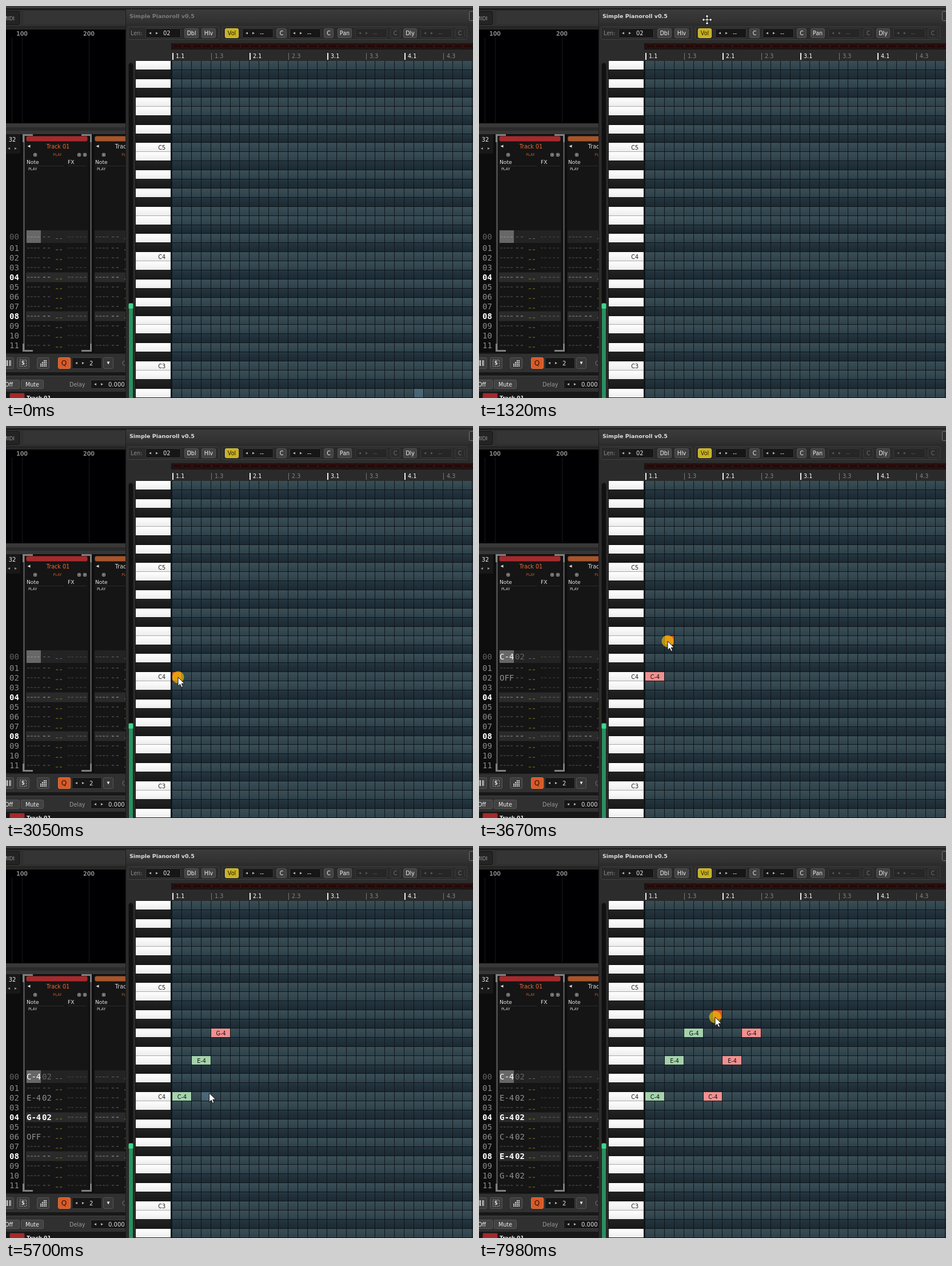
An HTML page with a canvas for the animation above (8 s loop, 817x685 px).

```html
<!DOCTYPE html>
<html lang="en">
<head>
<meta charset="utf-8">
<title>Piano roll</title>
<style>
html, body { margin: 0; width: 100%; height: 100%; overflow: hidden; background: #000; }
canvas { display: block; }
</style>
</head>
<body>
<canvas id="stage" width="817" height="685"></canvas>
<script>
const W = 817, H = 685, LOOP = 8000, STEP = 78.43, FIRST = 214;
const SANS = '"DejaVu Sans", sans-serif', MONO = '"DejaVu Sans Mono", monospace';
const GREEN = '#a4d2ac', PINK = '#f09090';
const view = document.getElementById('stage').getContext('2d');
const base = document.createElement('canvas');
base.width = W;
base.height = H;
let g = base.getContext('2d');

const colX = c => Math.round(291 + 16.925 * c);
const rowY = r => Math.round(96.3 + 15.9 * r);
const isBlack = r => [1, 3, 6, 8, 10].includes((21 - r + 24) % 12);

function box(x, y, w, h, fill) {
  g.fillStyle = fill;
  g.fillRect(x, y, w, h);
}

function shade(x, y, w, h, top, bottom) {
  const fill = g.createLinearGradient(0, y, 0, y + h);
  fill.addColorStop(0, top);
  fill.addColorStop(1, bottom);
  box(x, y, w, h, fill);
}

function round(x, y, w, h, fill, edge, r = 2) {
  g.beginPath();
  g.roundRect(x + .5, y + .5, w - 1, h - 1, r);
  g.fillStyle = fill;
  g.fill();
  if (edge) {
    g.strokeStyle = edge;
    g.lineWidth = 1;
    g.stroke();
  }
}

function text(s, x, y, color, { size = 9.6, bold = false, align = 'left', font = SANS } = {}) {
  g.font = `${bold ? 'bold ' : ''}${size}px ${font}`;
  g.textAlign = align;
  g.textBaseline = 'alphabetic';
  g.fillStyle = color;
  g.fillText(s, x, y + size * .365);
}

function triangle(x, y, dx, dy, color) {
  g.beginPath();
  g.moveTo(x + dx, y + dy);
  g.lineTo(x - dx - dy, y - dy - dx);
  g.lineTo(x - dx + dy, y - dy + dx);
  g.fillStyle = color;
  g.fill();
}

function arrows(x, y, color) {
  triangle(x, y, -2, 0, color);
  triangle(x + 12, y, 2, 0, color);
}

function button(s, x, y, w, h, on = true) {
  round(x, y, w, h, on ? '#424242' : '#2b2b2b', on ? '#565656' : '#3c3c3c');
  text(s, x + w / 2, y + h / 2, on ? '#eee' : '#707070', { align: 'center' });
}

function field(s, x, y, w, h, on = true) {
  const color = on ? '#e4e4e4' : '#5a5a5a';
  round(x, y, w, h, on ? '#161616' : '#262626', on ? '#3f3f3f' : '#3a3a3a');
  arrows(x + 8, y + h / 2, on ? '#bbb' : '#5a5a5a');
  text(s, x + 31, y + h / 2, color, { size: 10 });
}

function dashes(xs, y, w, color) {
  for (const x of xs) box(x, y, w, 1, color);
}

function drawTop() {
  box(0, 0, W, H, '#303030');
  box(0, 0, W, 4, '#3b3b3b');
  box(0, 4, W, 3, '#1c1c1c');
  round(-6, 9, 30, 24, '#242424', '#141414');
  text('MIDI', 15, 22, '#9a9a9a', { size: 9, align: 'right' });
  box(31, 9, 179, 22, '#343434');
  box(0, 35, 210, 5, '#252525');
  box(0, 41, 210, 164, '#000003');
  for (const x of [10, 28, 145]) box(x, 55, 1, 149, '#191919');
  text('100', 28, 48, '#858585', { bold: true, align: 'center' });
  text('200', 145, 48, '#858585', { bold: true, align: 'center' });
  box(0, 205, 210, 7, '#383838');
  box(0, 212, 210, 6, '#2a2a2a');
  box(0, 218, 210, 6, '#363636');
}

function drawTrack(x, color, label, labelColor) {
  round(x, 227, 108, 10, color, null, 3);
  triangle(x + 5, 245, -2.5, 0, '#ddd');
  text(label, x + 56, 245, labelColor, { align: 'center' });
  text('PLAY', x + 55, 260, '#c85a28', { size: 6.4, align: 'center' });
  for (const dx of [13, 90, 100]) {
    round(x + dx, 257, 6, 6, '#222', '#bbb', 1);
    box(x + dx + 2, 259, 2, 2, '#ddd');
  }
  text('Note', x + 1, 273, '#e6e6e6', { size: 9.2 });
  text('FX', x + 73, 273, '#e6e6e6', { size: 9.2 });
  box(x + 1, 279, 65, 1, '#2c2c2c');
  box(x + 73, 279, 33, 1, '#2c2c2c');
  text('PLAY', x + 4, 285, '#ddd', { size: 6.4 });
}

const lineY = n => n ? 422.5 + (n - 1) * 17 : 403;

function drawPattern() {
  box(0, 224, 210, 382, '#0d0d0d');
  box(0, 224, 25, 34, '#181818');
  text('32', 11, 233, '#eee', { size: 10, align: 'center' });
  arrows(5, 249, '#999');
  for (const x of [34, 154]) box(x, 226, 111, 379, '#151515');
  drawTrack(35, '#a52a2c', 'Track 01', '#f06a34');
  drawTrack(155, '#a6542b', 'Track 02', '#ddd');
  for (const x of [35, 155]) box(x, 392, 108, 22, '#232323');
  for (let n = 0; n < 12; n++) {
    const y = lineY(n), beat = n && n % 4 === 0;
    if (beat) for (const x of [35, 155]) box(x, y - 8, 108, 17, '#2a2a2a');
    const color = beat ? '#fff' : n ? '#8c8c8c' : '#626262';
    text(String(n).padStart(2, '0'), 6, y, color, { size: 14, font: MONO, bold: beat });
    for (const x of [0, 120]) {
      dashes([37, 43, 49, 55].map(v => v + x), y, 4, beat ? '#888' : '#555');
      dashes([65, 73].map(v => v + x), y, 4, beat ? '#aaa' : '#666');
      dashes([87, 94].map(v => v + x), y + 3, 4, n ? '#857b20' : '#666');
      dashes([108, 114, 122, 129, 136].map(v => v + x), y, 4, beat ? '#666' : '#444');
    }
  }
  for (const x of [30, 147]) box(x, 226, 3, 377, '#4a4a4a');
  for (const y of [224, 590]) {
    for (const x of [29, 147]) box(x, y, 3, 14, '#808080');
    const edge = y === 224 ? y : 601;
    box(29, edge, 18, 3, '#808080');
    box(132, edge, 18, 3, '#808080');
  }
}

function drawBottom() {
  box(0, 606, 210, 79, '#303030');
  box(0, 606, 210, 2, '#1b1b1b');
  for (const x of [-8, 19, 54]) round(x, 614, 22, 20, '#3d3d3d', '#555');
  box(1, 619, 2, 10, '#ddd');
  box(5, 619, 4, 10, '#999');
  g.setLineDash([2, 2]);
  g.strokeStyle = '#bbb';
  g.strokeRect(24.5, 618.5, 11, 11);
  g.setLineDash([]);
  text('S', 30, 624, '#eee', { size: 8, bold: true, align: 'center' });
  for (let i = 0; i < 16; i++) {
    const c = i % 4, r = i >> 2;
    if (r + c > 1) box(60 + c * 3, 619 + r * 3, 2, 2, '#ddd');
  }
  round(91, 614, 22, 20, '#d85a28', '#e47a44');
  text('Q', 101.5, 624, '#2a1208', { size: 12, align: 'center' });
  field('2', 115, 614, 53, 20);
  round(170, 614, 18, 20, '#383838', '#555');
  triangle(179, 624, 0, 2.5, '#eee');
  g.beginPath();
  g.arc(208, 624, 4, 1.5, 4.5);
  g.strokeStyle = '#777';
  g.stroke();
  box(0, 640, 210, 6, '#181818');
  box(0, 646, 210, 1, '#444');
  button('Off', -14, 653, 38, 16);
  button('Mute', 26, 653, 40, 16);
  text('Delay', 111, 661, '#999');
  field('0.000', 148, 653, 70, 16);
  box(0, 674, 210, 11, '#171717');
  round(6, 676, 27, 14, '#a52a2c', '#4a2020');
  text('Track 01', 36, 685, '#e8e8e8', { bold: true, size: 9 });
}

function drawTools() {
  box(209, 6, 608, 679, '#2c2c2c');
  box(209, 6, 1, 679, '#1a1a1a');
  shade(210, 6, 607, 24, '#3b3b3b', '#303030');
  round(810, 9, 20, 17, '#303030', '#777');
  round(213, 36, 160, 23, '#2a2a2a', '#414141');
  round(378, 36, 429, 23, '#2a2a2a', '#414141');
  text('Len:', 218, 47.5, '#8b8b8b');
  field('02', 244, 39, 62, 17);
  button('Dbl', 312, 39, 25, 17);
  button('Hlv', 342, 39, 25, 17);
  round(383, 39, 24, 17, '#c8b122', '#ddc744');
  text('Vol', 395, 47.5, '#262000', { align: 'center' });
  field('--', 413, 39, 55, 17);
  button('C', 473, 39, 18, 17);
  field('--', 496, 39, 55, 17);
  button('C', 556, 39, 17, 17);
  button('Pan', 580, 39, 25, 17);
  field('--', 611, 39, 56, 17, false);
  button('C', 672, 39, 18, 17, false);
  button('Dly', 695, 39, 24, 17);
  field('--', 725, 39, 56, 17, false);
  button('C', 785, 39, 18, 17, false);
}

function drawRoll() {
  box(289, 65, 528, 620, '#141414');
  for (let c = 0; c < 31; c++) {
    round(colX(c) + 1, 66, 16, 8, '#250909', '#3a1414', 1);
  }
  box(289, 76, 528, 20, '#2a2a2a');
  for (let i = 0; i < 8; i++) {
    const major = i % 2 === 0, x = colX(i * 4), color = major ? '#fff' : '#858585';
    box(x, 82, major ? 2 : 1, 12, major ? '#eee' : '#777');
    text(`${(i >> 1) + 1}.${major ? 1 : 3}`, x + 6, 87.5, color);
  }
  box(288, 96, 529, 589, '#0e161a');
  box(226, 96, 62, 589, '#161616');
  for (let r = 0; r < 37; r++) {
    const y = rowY(r), h = rowY(r + 1) - y - 1, dark = isBlack(r);
    if (dark) shade(228, y, 60, h, '#222', '#181818');
    else shade(227, y, 61, h, '#fff', '#ededed');
    if (!dark && r < 36 && !isBlack(r + 1)) box(227, y + h, 61, 1, '#aaa');
    for (let c = 0; c < 32; c++) {
      const x = colX(c), w = colX(c + 1) - x - 1;
      shade(x, y, w, h, dark ? '#253640' : '#3a4e56', dark ? '#1b2932' : '#2e414a');
    }
  }
  [9, 21, 33].forEach((r, i) => {
    text(`C${5 - i}`, 279, rowY(r) + 8.5, '#222', { align: 'right' });
  });
  round(214, 99, 9, 592, '#101010', '#1e1e1e', 4);
  box(215, 525, 7, 160, '#2a9060');
  round(214, 519, 9, 11, '#3fd68a', '#257a4e');
}

function mark(c, r, fill) {
  box(colX(c), rowY(r), colX(c + 1) - colX(c) - 1, rowY(r + 1) - rowY(r) - 1, fill);
}

function note(label, c, r, selected) {
  const x = colX(c), w = colX(c + 2) - x - 1, y = rowY(r), h = rowY(r + 1) - y - 1;
  box(x, y, w, h, selected ? PINK : GREEN);
  text(label, x + w / 2 + .5, y + 8.5, '#111', { align: 'center' });
}

function entry(n, s, inst = '02') {
  const y = lineY(n), beat = n && n % 4 === 0, bg = beat ? '#2a2a2a' : n ? '#151515' : '#232323';
  const style = { size: 14, font: MONO, bold: beat };
  if (n) box(36, y - 8, 26, 16, bg);
  text(s, 36, y, beat || !n ? '#fff' : '#8f8f8f', style);
  if (!inst) return;
  box(62, y - 8, 19, 16, bg);
  text(inst, 63, y, beat ? '#fff' : n ? '#8f8f8f' : '#666', style);
}

// Pointer way points: time, x, y
const path = [
  [210, 719, 686], [440, 640, 520], [720, 492, 230], [900, 415, 55], [1000, 405, 19],
  [1240, 399, 24], [1470, 399, 24], [1630, 413, 50], [1860, 362, 190], [2030, 325, 350],
  [2180, 302, 437], [2260, 284, 480], [2340, 293, 486], [2500, 311, 455], [2740, 301, 439],
  [3050, 301, 439], [3440, 330, 376], [3830, 330, 376], [4070, 367, 305],
  [4220, 368, 312], [4300, 369, 321], [4690, 369, 321], [4770, 378, 342], [5080, 379, 408],
  [5240, 380, 409], [5330, 380, 409], [5700, 350, 437], [6020, 350, 437], [6330, 380, 441],
  [7190, 380, 441], [7430, 429, 390], [7740, 413, 299], [8000, 413, 299]
];
const presses = [[3050, 3130], [3670, 3830], [4530, 4690], [5860, 5940], [7980, 8000]];

function pointer(t) {
  const q = FIRST + STEP * Math.floor((t - FIRST) / STEP) + 6;
  const i = Math.max(1, path.findIndex(p => p[0] > q));
  const [t0, x0, y0] = path[i - 1], [t1, x1, y1] = path[i];
  const k = Math.max(0, (q - t0) / (t1 - t0));
  return [x0 + (x1 - x0) * k, y0 + (y1 - y0) * k];
}

function polygon(points, fill, edge) {
  g.beginPath();
  points.forEach(([x, y]) => g.lineTo(x, y));
  g.closePath();
  g.lineJoin = 'round';
  g.lineWidth = 1;
  g.fillStyle = fill;
  g.fill();
  g.strokeStyle = edge;
  g.stroke();
}

function drawArrow(x, y) {
  g.save();
  g.translate(x, y);
  polygon([[0, 0], [0, 15.5], [3.6, 12.2], [6, 17.6], [8.6, 16.5], [6.2, 11.3], [11.2, 11]], '#fff', '#111');
  g.restore();
}

function drawMover(x, y) {
  const arm = [[-1, -1], [-1, -5], [-3.5, -5], [0, -9], [3.5, -5], [1, -5], [1, -1]];
  const turn = (p, n) => n ? turn([-p[1], p[0]], n - 1) : p;
  g.save();
  g.translate(x, y);
  polygon([0, 1, 2, 3].flatMap(n => arm.map(p => turn(p, n))), '#fff', '#111');
  g.restore();
}

function drawPointer(t) {
  const [x, y] = pointer(t);
  const down = presses.some(([a, b]) => t >= a && t < b);
  let c = Math.floor((x - 290.5) / 16.925), r = Math.floor((y - 96) / 15.9);
  if (t < 210) [c, r] = [25, 36];
  if (x > 290 && y > 96 && r < 37) {
    const hot = down && t < 5800 || t >= 7980;
    mark(c, r, hot ? '#e2501f' : 'rgba(120,160,195,.33)');
  }
  if (down) {
    g.beginPath();
    g.arc(x, y, 10.5, 0, 7);
    g.fillStyle = 'rgba(238,200,10,.64)';
    g.fill();
  }
  if (t < 210) return;
  if (t >= 1160 && t < 1620) drawMover(x, y);
  else drawArrow(x, y);
}

function drawNotes(t) {
  box(36, 392, 25, 22, '#676767');
  if (t < 3130) {
    dashes([37, 43, 49, 55], 403, 4, '#909090');
    return;
  }
  entry(0, 'C-4');
  if (t < 3830) entry(2, 'OFF', '');
  else {
    entry(2, 'E-4');
    if (t < 4690) entry(4, 'OFF', '');
  }
  if (t >= 4690) {
    entry(4, 'G-4');
    if (t < 6950) entry(6, 'OFF', '');
  }
  if (t >= 6950) ['C-4', 'E-4', 'G-4'].forEach((s, i) => entry(6 + i * 2, s));

  note('C-4', 0, 21, t < 3830);
  if (t >= 3830) note('E-4', 2, 17, t < 4690);
  if (t >= 4690) note('G-4', 4, 14, t < 5940);
  if (t >= 7030) {
    note('C-4', 6, 21, true);
    note('E-4', 8, 17, true);
    note('G-4', 10, 14, true);
  }
}

function draw(now) {
  const t = now % LOOP;
  g = view;
  g.drawImage(base, 0, 0);
  text('Simple Pianoroll v0.5', 216, 18, t < 1160 ? '#7c7c7c' : '#dedede', { size: 9.5, bold: true });
  drawNotes(t);
  drawPointer(t);
  requestAnimationFrame(draw);
}

drawTop();
drawPattern();
drawBottom();
drawTools();
drawRoll();
requestAnimationFrame(draw);
</script>
</body>
</html>
```
